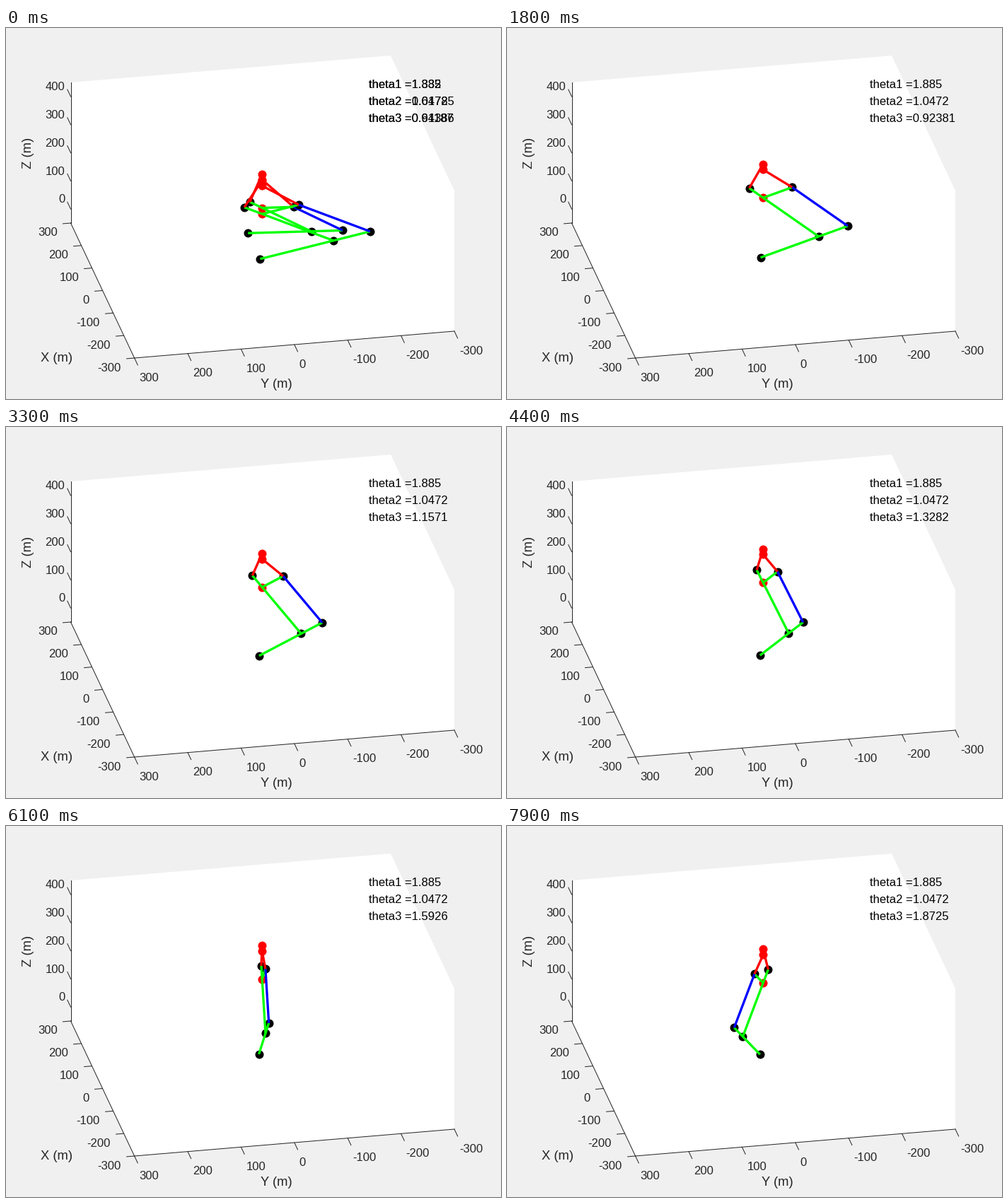
These frames come from a looping animation (700 px wide and 525 px high, 8000 ms). A matplotlib script:

```python
import numpy as np
import matplotlib.pyplot as plt
from matplotlib.animation import FuncAnimation

plt.rcParams["font.family"] = "Liberation Sans"

W, H, DPI = 700, 525, 100
PX = 72 / DPI                       # one pixel in points
FRAMES, INTERVAL = 80, 100
INK = "#262626"
TICK, LABEL = 16.67 * PX, 18.33 * PX

THIGH, SHIN = 160, 160              # link lengths
THETA1, THETA2 = 0.6 * np.pi, np.pi / 3
THETA3_START, THETA3_STEP = 0.643863, 0.0155526
PARKED = (1.332, 0.61785, 0.91187)  # pose left over from the previous move

fig = plt.figure(figsize=(W / DPI, H / DPI), dpi=DPI, facecolor="#f0f0f0")
ax = fig.add_axes([0, 0, 1, 1])
ax.set_xlim(0, W)
ax.set_ylim(H, 0)
ax.axis("off")


def project(p):
    """Orthographic view of a point in metres, in pixels."""
    x, y, z = p
    return np.array([362.2 - 0.15 * x - 0.7533 * y,
                     332.6 - 0.3183 * x + 0.0633 * y - 0.398 * z])


def label(x, y, s, size=TICK, color=INK, **kw):
    """Text whose digits are centred on y."""
    dy = 0 if kw.get("rotation") else 0.36 * size / PX
    return ax.text(x, y + dy, s, size=size, color=color, va="baseline", **kw)


def stroke(start, step):
    end = start + step
    ax.plot([start[0], end[0]], [start[1], end[1]], color=INK, lw=PX, zorder=1)


def draw_axes():
    top, left, front, right = np.array(
        [(91.5, 77), (91.5, 276), (181.6, 467), (634, 429)])
    box = [top, (544, 39), (634, 230), right, front, left]
    ax.fill(*zip(*box), color="white", lw=0, zorder=0)
    for a, b in ((top, left), (left, front), (front, right)):
        stroke(a, b - a)

    along_x = (front - left) / np.hypot(*(front - left)) * 11
    along_y = (right - front) / np.hypot(*(right - front)) * 11
    for k in range(7):
        value = str(300 - 100 * k)
        stroke(left + (front - left) * k / 6, -along_y)
        stroke(front + (right - front) * k / 6, along_x)
        label(73.4 + 14.9 * k, 287.7 + 32 * k, value, ha="right")
        label(188.6 + 75.4 * k, 493.5 - 6.33 * k, value, ha="left")
    for k in range(5):
        y = 97 + 39.8 * k
        stroke(np.array((91.5, y)), -along_x)
        label(83.4, y - 14.8, str(400 - 100 * k), ha="right")

    label(71.5, 465, "X (m)", LABEL, ha="center")
    label(382.3, 502.8, "Y (m)", LABEL, ha="center")
    label(35.5, 176.8, "Z (m)", LABEL, ha="center", rotation=90,
          rotation_mode="anchor")


def link(length, tilt, bend, side):
    """Link vector swung by bend inside a plane leaning by tilt."""
    return length * np.array([np.cos(tilt) * np.sin(bend),
                              side * np.cos(bend),
                              -np.sin(tilt) * np.sin(bend)])


def joints(t1, t2, t3):
    """Leg linkage standing with its foot on the ground."""
    thigh, shin = link(THIGH, t1, t3, -1), link(SHIN, t2, t3, 1)
    hip = np.array([0, 0, -(thigh + shin)[2]])
    knee = hip + thigh
    points = dict(hip=hip, knee=knee, foot=knee + shin,
                  lever=hip - thigh / 4, crank=hip - shin / 2,
                  heel=knee - shin / 2,
                  low=hip + [0, 0, 100], high=hip + [0, 0, 120])
    return {name: project(p) for name, p in points.items()}


class Leg:
    DOTS = (("black", ("lever", "crank", "knee", "heel", "foot")),
            ("red", ("hip", "low", "high")))
    BARS = (("lime", ("lever", "hip", "knee")),
            ("lime", ("heel", "knee", "foot")),
            ("lime", ("hip", "crank")),
            ("blue", ("crank", "heel")),
            ("red", ("high", "lever")),
            ("red", ("low", "crank")))

    def __init__(self, z):
        self.parts = []
        for color, names in self.DOTS:
            art, = ax.plot([], [], "o", color=color, ms=12 * PX, mew=0, zorder=z)
            self.parts.append((art, names))
        for color, names in self.BARS:
            art, = ax.plot([], [], color=color, lw=3.3 * PX, zorder=z + 1,
                           solid_capstyle="butt", solid_joinstyle="round")
            self.parts.append((art, names))
        self.texts = [label(512.6, 79.3 + 24 * k, "", color="black", ha="left",
                            zorder=9) for k in range(3)]

    def pose(self, *angles):
        pts = joints(*angles)
        for art, names in self.parts:
            art.set_data(*zip(*(pts[n] for n in names)))
        for k, (text, angle) in enumerate(zip(self.texts, angles), 1):
            text.set_text(f"theta{k} ={angle:.5g}")

    def show(self, on):
        for art in [a for a, _ in self.parts] + self.texts:
            art.set_visible(on)


draw_axes()
ghost, leg = Leg(3), Leg(5)
ghost.pose(*PARKED)


def update(i):
    ghost.show(i == 0)
    leg.pose(THETA1, THETA2, THETA3_START + THETA3_STEP * i)
    return []


anim = FuncAnimation(fig, update, frames=FRAMES, interval=INTERVAL,
                     repeat=True, repeat_delay=0, blit=False)
plt.show()
```
